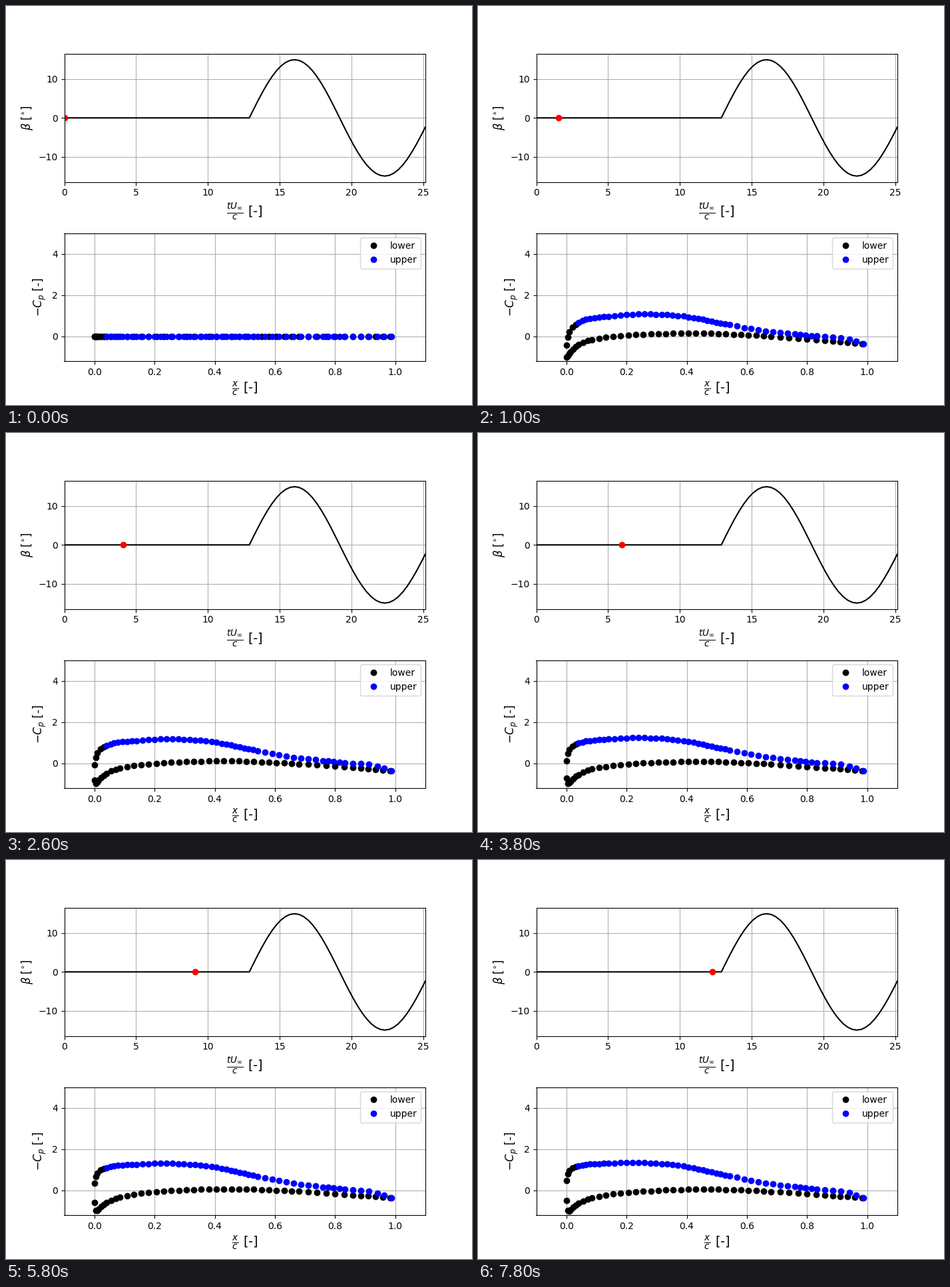
A matplotlib script that plays this animation: 700x600 px, repeating every 8 s.

```python
import numpy as np
import matplotlib.pyplot as plt
from matplotlib.animation import FuncAnimation

STEPS = 40
LAST = STEPS - 1
DT = np.pi / 10          # convective time per step
START = 41 * DT          # flap starts moving here
TAU = 22                 # decay of the starting transient, in steps
NOSE = 5                 # leading upper sensors shown with the lower side


def sensors(index, x):
    """Sensors spread evenly between a few key ones; x in chord / 1000."""
    return np.interp(np.arange(index[-1] + 1), index, x) / 1000


def spline(x, knots, values):
    """Cubic Hermite curve, taken over sqrt(x) to resolve the nose."""
    u, k = np.sqrt(x), np.sqrt(knots)
    slope = np.gradient(values, k)
    i = np.clip(np.searchsorted(k, u) - 1, 0, len(k) - 2)
    h = k[i + 1] - k[i]
    s = (u - k[i]) / h
    return ((1 + 2 * s) * (1 - s) ** 2 * values[i]
            + s * (1 - s) ** 2 * h * slope[i]
            + s * s * (3 - 2 * s) * values[i + 1]
            + s * s * (s - 1) * h * slope[i + 1])


def transient(n):
    """1 at step 5, 0 at the last step."""
    decay = np.exp(-np.array([n, 5, LAST]) / TAU)
    return (decay[0] - decay[2]) / (decay[1] - decay[2])


x_up = sensors([0, 1, 2, 5, 8, 12, 20, 25, 27, 35, 44, 48, 52, 54],
               [.5, 4, 10, 41, 78, 140, 298, 389, 424, 542, 759, 832, 940, 987])
x_low = sensors([0, 3, 6, 9, 11, 33, 38, 40, 44],
                [.5, 15, 41, 85, 131, 680, 830, 886, 983])

# Settled -Cp on each side
end_up = spline(
    x_up,
    np.array([.0005, .004, .0105, .041, .14, .258, .39, .54, .64, .83, .94, .987]),
    np.array([.475, .797, .96, 1.18, 1.31, 1.34, 1.175, .705, .41, .06, -.12, -.36]))
end_low = spline(
    x_low,
    np.array([.0005, .004, .0085, .023, .054, .131, .304, .456, .68, .908, .983]),
    np.array([-.49, -.94, -1, -.83, -.524, -.23, -.01, .053, -.057, -.28, -.36]))

# Part of it still missing early on: fades to the tail, peaks at the nose
u_up, u_low = np.sqrt(x_up), np.sqrt(x_low)
lag_up = (1 - u_up) * (.54 + .4 * np.exp(-(u_up / .17) ** 2))
lag_low = 1.37 * np.exp(-23 * u_low) - .3 * (1 - u_low)

fig, (top, bottom) = plt.subplots(2, 1, figsize=(7, 6), dpi=100)
fig.subplots_adjust(left=.125, right=.9, bottom=.11, top=.88, hspace=.4)

t = np.arange(81) * DT
beta = np.where(t > START, 15 * np.sin((t - START) / 2), 0)
top.plot(t, beta, color="black")
dot, = top.plot([], [], "o", color="red")
top.set_xlim(0, 8 * np.pi)
top.set_ylim(-16.5, 16.5)
top.set_xlabel(r"$\frac{tU_\infty}{c}$ [-]", fontsize=14)
top.set_ylabel(r"$\beta$ [$^{\circ}$]", fontsize=12)
top.grid()

lower, = bottom.plot([], [], "o", color="black", label="lower")
upper, = bottom.plot([], [], "o", color="blue", label="upper")
bottom.set_xlim(-.1, 1.1)
bottom.set_ylim(-1.2, 5)
bottom.set_xlabel(r"$\frac{x}{c}$ [-]", fontsize=14)
bottom.set_ylabel(r"$-C_p$ [-]", fontsize=12)
bottom.grid()
bottom.legend(loc="upper right")


def draw(n):
    flow = n > 0         # the stream starts with the first step
    cp_up = flow * (end_up - transient(n) * lag_up)
    cp_low = flow * (end_low - transient(n) * lag_low)
    dot.set_data([n * DT], [0])
    lower.set_data(np.append(x_low, x_up[:NOSE]),
                   np.append(cp_low, cp_up[:NOSE]))
    upper.set_data(x_up[NOSE:], cp_up[NOSE:])
    return dot, lower, upper


anim = FuncAnimation(fig, draw, frames=STEPS, init_func=lambda: draw(0),
                     interval=200, repeat=True, repeat_delay=0)
plt.show()
```
